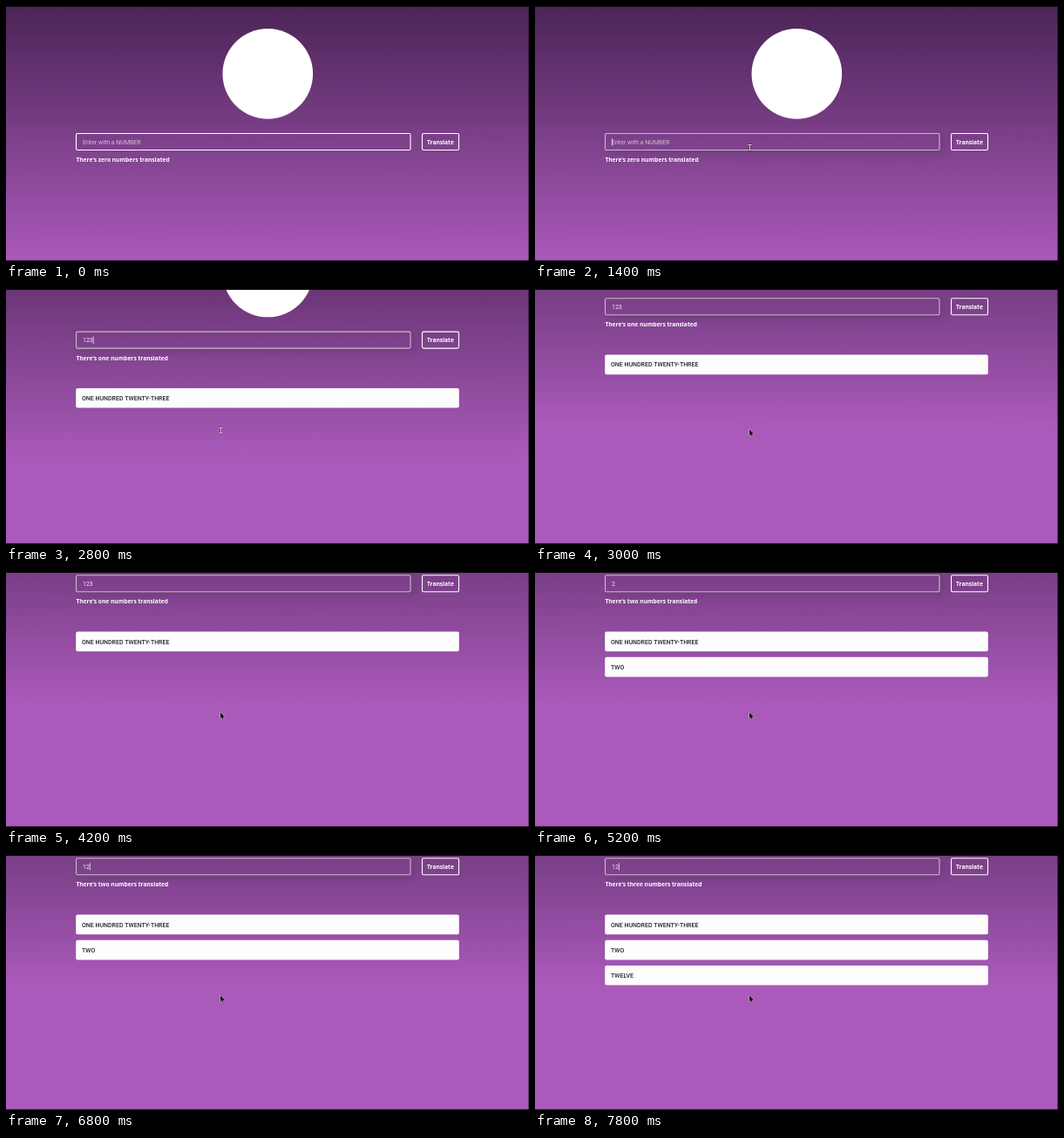
An HTML page with a canvas for the animation above (8000 ms loop, 600 px wide and 293 px high).

```html
<!DOCTYPE html>
<html lang="en">
<head>
<meta charset="utf-8">
<title>Numbers to Words</title>
<style>
  html, body { margin: 0; width: 100%; height: 100%; overflow: hidden; background: #aa5aba; }
  canvas { display: block; width: 100vw; height: 100vh; }
</style>
</head>
<body>
<canvas id="stage"></canvas>
<script>
const W = 600, H = 293, LOOP = 8000, STEP = 200;
const UI = '"Noto Sans", sans-serif';
const BODY = 'Roboto, sans-serif';
const FIELD = [80.5, 146.5, 383.5, 19];
const BUTTON = [477.5, 146.5, 42, 19];
const SCROLL = { start: 2600, length: 630, distance: 142.7 };
const FOCUS_AT = 1200;
const REPEAT = { from: 5400, to: 6200 };

// Each key press: time and the resulting field text
const keys = [
  [1800, '1'], [2200, '12'], [2400, '123'],
  [4400, ''], [4600, '2'],
  [6400, ''], [6600, '1'], [6800, '12']
];
const answers = [
  [2800, 'ONE HUNDRED TWENTY-THREE'],
  [5000, 'TWO'],
  [7400, 'TWELVE']
];
const counts = ['zero', 'one', 'two', 'three'];

const canvas = document.getElementById('stage');
const ctx = canvas.getContext('2d');
let sx = 1, sy = 1;

function resize() {
  const dpr = window.devicePixelRatio || 1;
  canvas.width = Math.round(innerWidth * dpr);
  canvas.height = Math.round(innerHeight * dpr);
  sx = canvas.width / W;
  sy = canvas.height / H;
}

const clamp = v => Math.max(0, Math.min(1, v));
const easeOut = p => 1 - (1 - p) ** 3;
const easeInOut = p => p * p * (3 - 2 * p);

function text(str, x, y, font, color) {
  ctx.font = font;
  ctx.fillStyle = color;
  ctx.fillText(str, x, y);
}

function roundRect(x, y, w, h, r) {
  ctx.beginPath();
  ctx.roundRect(x, y, w, h, r);
}

function outline(box, color) {
  roundRect(...box, 1.6);
  ctx.strokeStyle = color;
  ctx.lineWidth = 1.1;
  ctx.stroke();
}

function background(scroll) {
  const fill = ctx.createLinearGradient(0, -scroll, 0, H - scroll);
  fill.addColorStop(0, '#4b2456');
  fill.addColorStop(1, '#aa5aba');
  ctx.fillStyle = fill;
  ctx.fillRect(0, 0, W, H);
}

function fieldShadow(alpha) {
  const [x, y, w, h] = FIELD;
  const far = 2000;
  ctx.save();
  ctx.beginPath();
  ctx.rect(0, -far, W, far * 2);
  ctx.roundRect(x, y, w, h, 2);
  ctx.clip('evenodd');
  ctx.shadowColor = `rgba(0, 0, 0, ${0.1 * alpha})`;
  ctx.shadowBlur = 10 * sy;
  ctx.shadowOffsetX = (far + 4) * sx;
  ctx.shadowOffsetY = 5 * sy;
  roundRect(x - far, y, w, h, 2);
  ctx.fillStyle = '#000';
  ctx.fill();
  ctx.restore();
}

function field(t) {
  const focus = clamp((t - FOCUS_AT + STEP) / 400);
  if (focus) fieldShadow(focus);
  outline(FIELD, focus ? '#c6bec4' : '#fff');

  const pressed = keys.filter(k => k[0] <= t);
  const [lastKey, value] = pressed.length ? pressed[pressed.length - 1] : [FOCUS_AT, ''];
  const font = '7px ' + BODY;
  if (value) text(value, 88, 158.7, font, '#f3ebf5');
  else text('Enter with a NUMBER', 88, 158.7, font, '#d2c1d5');

  if (focus && (t - lastKey) % 1000 < 500) {
    ctx.font = font;
    ctx.fillStyle = '#f3ebf5';
    ctx.fillRect(88 + ctx.measureText(value).width, 152, 0.8, 8.4);
  }
}

function answerList(t) {
  const shown = answers.filter(a => a[0] <= t);
  shown.forEach(([, word], i) => {
    const y = 211.3 + i * 29.2;
    roundRect(80.2, y, 439.6, 22.6, 2);
    ctx.fillStyle = '#fdfdfe';
    ctx.fill();
    const repeated = word === 'TWO' && t >= REPEAT.from && t < REPEAT.to;
    text(word, 87, y + 13.9, (repeated ? 'italic 700 7px ' : '500 7px ') + BODY,
      repeated ? '#d3202c' : '#212529');
  });
  return shown.length;
}

function arrow(x, y) {
  const pts = [[0, 0], [0, 7], [1.6, 5.6], [2.7, 8], [3.8, 7.4], [2.8, 5.2], [5, 5]];
  ctx.beginPath();
  pts.forEach(([px, py]) => ctx.lineTo(x + px, y + py));
  ctx.closePath();
  ctx.lineWidth = 0.9;
  ctx.strokeStyle = 'rgba(235, 225, 240, 0.75)';
  ctx.stroke();
  ctx.fillStyle = '#111';
  ctx.fill();
}

function beam(x, y) {
  ctx.beginPath();
  for (const end of [-3, 3]) {
    ctx.moveTo(x - 2.2, y + end);
    ctx.lineTo(x + 2.2, y + end);
  }
  ctx.moveTo(x, y - 3);
  ctx.lineTo(x, y + 3);
  ctx.strokeStyle = 'rgba(40, 25, 45, 0.6)';
  ctx.lineWidth = 1.8;
  ctx.stroke();
  ctx.strokeStyle = '#dcd4de';
  ctx.lineWidth = 0.9;
  ctx.stroke();
}

function pointer(t) {
  if (t < STEP) return;
  const p = easeInOut(clamp((t - STEP) / 800));
  const x = 600 - 354 * p, y = 236 - 74.5 * p;
  const overField = y < 166 && x < 464;
  if (overField && t < 3000) beam(x + 0.5, y + 1);
  else arrow(x, y);
}

function windowEdge() {
  ctx.fillStyle = '#0d0710';
  ctx.fillRect(0, 0, W, 1);
  ctx.fillStyle = 'rgba(20, 8, 24, 0.8)';
  ctx.fillRect(0, H - 1, W, 1);
  ctx.fillStyle = 'rgba(20, 8, 24, 0.5)';
  ctx.fillRect(W - 1, 0, 1, H);
}

function draw(t) {
  const p = clamp((t - SCROLL.start) / SCROLL.length);
  const scroll = SCROLL.distance * easeOut(p);
  ctx.setTransform(sx, 0, 0, sy, 0, 0);
  background(scroll);

  ctx.save();
  ctx.translate(0, -scroll);
  ctx.beginPath();
  ctx.arc(300.3, 77.9, 51.8, 0, Math.PI * 2);
  ctx.fillStyle = '#fff';
  ctx.fill();

  field(t);
  outline(BUTTON, '#fff');
  const bold = '700 6.65px ' + UI;
  text('Translate', 483, 158.6, bold, '#fff');
  const total = answerList(t);
  text(`There's ${counts[total]} numbers translated`, 80.4, 179, bold, '#fff');
  ctx.restore();

  pointer(t);
  windowEdge();
}

const start = performance.now();
function tick() {
  const t = (performance.now() - start) % LOOP;
  draw(Math.floor(t / STEP) * STEP);
  requestAnimationFrame(tick);
}

addEventListener('resize', resize);
resize();
tick();
</script>
</body>
</html>
```
